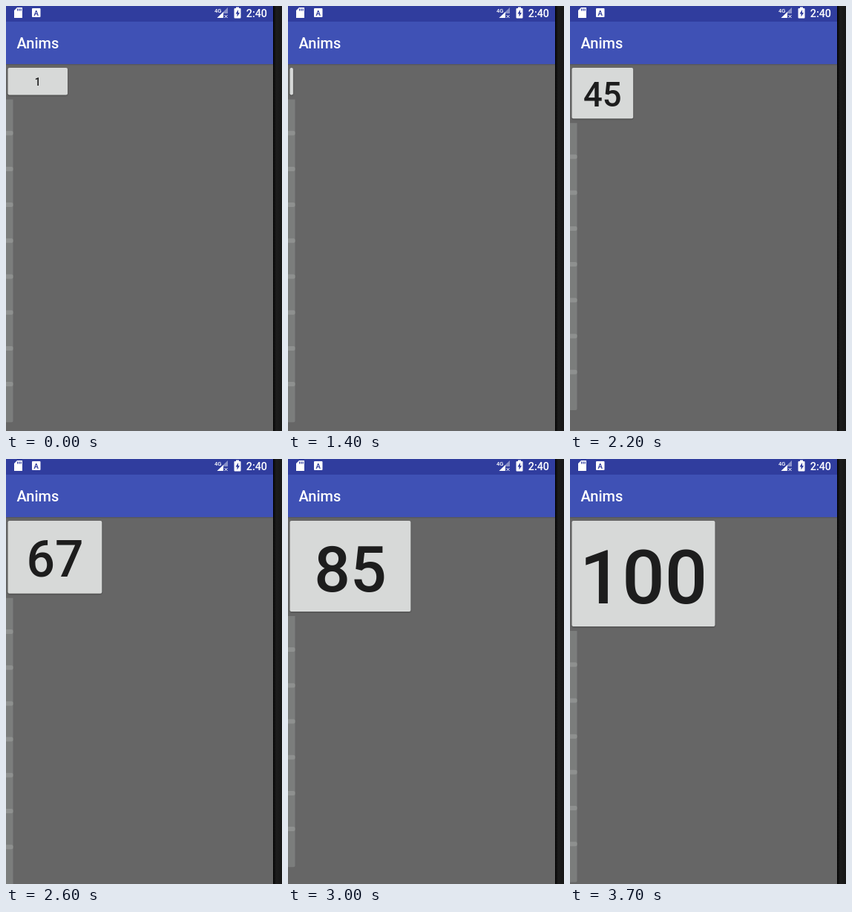
Write an HTML page with a canvas that moves like this. It is 372x571 px and loops after 4.2 s.

```html
<!DOCTYPE html>
<html>
<head>
<meta charset="utf-8">
<style>
html, body { margin: 0; width: 100%; height: 100%; overflow: hidden; background: #666; }
canvas { display: block; }
</style>
</head>
<body>
<canvas id="stage" width="372" height="571"></canvas>
<script>
const c = document.getElementById('stage').getContext('2d');
const LOOP = 4200, STEP = 100, ROW = 48.2, TOP = 83, LEFT = 2.5;
const FONT = 'Roboto, "Noto Sans", sans-serif';

// Time and counter pairs, joined by a cosine ease
const KEYS = [[1000, 1], [1800, 22.3], [1900, 27.3], [2200, 45.3], [2500, 60.3],
  [2600, 67.3], [3000, 85.3], [3100, 89.3], [3700, 100]];
const ease = u => 1 + 99 * (1 - Math.cos(Math.PI * u)) / 2;
const unease = v => Math.acos(1 - 2 * (v - 1) / 99) / Math.PI;

function counter(t) {
  const i = KEYS.findIndex(k => k[0] > t);
  if (i < 0) return 100;
  const [t0, v0] = KEYS[i - 1], [t1, v1] = KEYS[i];
  const a = unease(v0), b = unease(v1);
  return Math.floor(ease(a + (b - a) * (t - t0) / (t1 - t0)) + 1e-6);
}

function rect(x, y, w, h, color, r = 0) {
  c.fillStyle = color;
  c.beginPath();
  c.roundRect(x, y, w, h, r);
  c.fill();
}

function poly(color, ...pts) {
  c.fillStyle = color;
  c.beginPath();
  for (let i = 0; i < pts.length; i += 2) c.lineTo(pts[i], pts[i + 1]);
  c.fill();
}

function label(str, x, y, size, color = '#fff', align = 'left', weight = 500) {
  c.font = `${weight} ${size}px ${FONT}`;
  c.textAlign = align;
  c.fillStyle = color;
  c.fillText(str, x, y);
}

function statusBar() {
  rect(0, 0, 360, 21, '#303d9e');
  // memory card
  poly('#fff', 11, 6, 15, 2, 22, 2, 22, 16, 11, 16);
  for (const x of [15, 17.3, 19.6]) rect(x, 3.5, 1.2, 3, '#303d9e');
  // letter badge
  rect(35, 3, 11.5, 12, '#fff', 1);
  label('A', 40.7, 12.5, 9.5, '#303d9e', 'center', 700);
  // signal
  label('4G', 281, 8.5, 7.5);
  poly('#8a92c9', 299, 2, 299, 10, 293, 10, 293, 16, 284.5, 16);
  poly('#fff', 293, 8, 293, 16, 284.5, 16);
  c.strokeStyle = '#fff';
  c.lineWidth = 1;
  c.beginPath();
  c.moveTo(294.5, 12); c.lineTo(298.5, 16);
  c.moveTo(298.5, 12); c.lineTo(294.5, 16);
  c.stroke();
  // battery
  rect(310, 1.5, 4, 3, '#fff');
  rect(307.5, 3, 9, 13.5, '#fff', 1);
  poly('#303d9e', 313, 5, 309.5, 10.5, 311.5, 10.5, 311.5, 14.5, 315, 9, 313, 9);
  label('2:40', 352, 14.5, 14.3, '#fff', 'right');
}

function chrome() {
  rect(0, 0, 372, 571, '#666');
  rect(0, 78, 360, 1, '#555762');
  rect(0, 79, 360, 1, '#606060');
  statusBar();
  rect(0, 21, 360, 57, '#3f51b5');
  label('Anims', 14.5, 56.5, 20);
  const g = c.createLinearGradient(361, 0, 372, 0);
  g.addColorStop(0, '#0c0c0c');
  g.addColorStop(0.3, '#1c1c1c');
  g.addColorStop(1, '#161616');
  rect(360, 0, 12, 571, g);
  rect(360, 0, 1, 571, '#000');
}

function rows(y, n) {
  rect(0, y, 9.5, n * ROW, '#7b7d7c', [0, 0, 2, 0]);
  for (let k = 1; k < n; k++) rect(0, y + k * ROW - 6, 9.5, 6, '#8e908f', [0, 2, 2, 0]);
}

function button(right, height, pressed) {
  if (right <= LEFT + 0.5) return;
  c.save();
  c.shadowColor = pressed ? 'rgba(0,0,0,.5)' : 'rgba(0,0,0,.3)';
  c.shadowBlur = pressed ? 4 : 2;
  c.shadowOffsetY = 1;
  rect(LEFT, TOP, right - LEFT, height, pressed ? '#d5d7d6' : '#d7d9d8', 2);
  c.restore();
}

function draw(now) {
  const t = Math.floor(now % LOOP / STEP) * STEP;
  const growing = t >= 1000;
  const v = growing ? counter(t) : 1;
  const size = growing ? v * 1.01 : 14;
  const right = growing ? 39 + 2.006 * (v - 22) : 83;
  const str = String(v);
  const lines = growing && v > 9 && v < 28 ? [...str] : [str];
  const textHeight = size * (1.327 + 1.172 * (lines.length - 1));
  const height = Math.max(36.5, textHeight + 8);
  const count = t < 1900 ? 9 : v < 80 ? 8 : 7;

  chrome();
  rows(TOP + height + 6, count);
  button(right, height, t === 900);

  const inner = right - LEFT - 16;
  if (inner > 0) {
    c.save();
    c.beginPath();
    c.rect(LEFT + 8, TOP, inner, height);
    c.clip();
    const base = TOP + (height - textHeight) / 2 + 1.056 * size;
    lines.forEach((s, i) =>
      label(s, (LEFT + right) / 2, base + i * 1.172 * size, size, '#1d1d1d', 'center'));
    c.restore();
  }
}

const start = performance.now();
function loop() {
  draw(performance.now() - start);
  requestAnimationFrame(loop);
}
loop();
</script>
</body>
</html>
```
